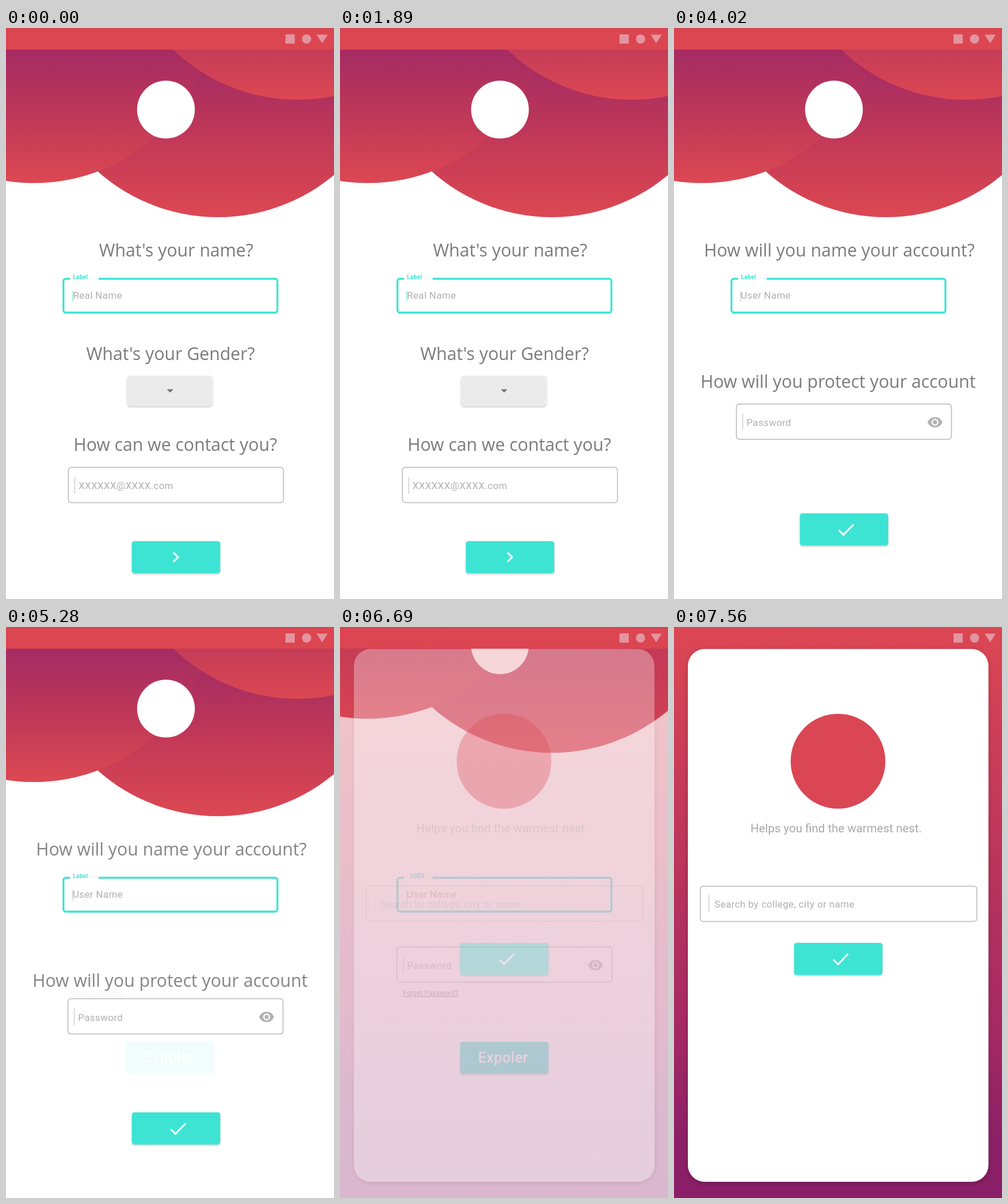
Recreate the animation shown at these times as an HTML page. Size 568 px wide and 987 px high, loop 7.8 s.

```html
<!DOCTYPE html>
<html lang="en">
<head>
<meta charset="utf-8">
<title>Sign-up flow</title>
<style>
  html, body { margin: 0; width: 100%; height: 100%; overflow: hidden; background: #fff; }
  svg { display: block; }
  .title { font: 30.1px "Open Sans", "Noto Sans", sans-serif; fill: #7b7b7b; }
  .hint { font: 17px Roboto, sans-serif; letter-spacing: .3px; fill: #b0b0b0; }
  .label { font: 700 10px Roboto, sans-serif; letter-spacing: .3px; fill: #3ee0d2; }
  .link { font: 12px Roboto, sans-serif; fill: #8c8c8c; text-decoration: underline; }
  .cta { font: 500 25px Roboto, sans-serif; letter-spacing: .5px; fill: #fff; }
  .tag { font: 20.4px Roboto, sans-serif; fill: #a9a9a9; }
  .option { font: 17px Roboto, sans-serif; fill: #767676; text-anchor: middle; }
  .icon { fill: none; stroke: #fff; stroke-width: 3; }
  .box { fill: #fff; stroke: #b9b9b9; stroke-width: 1.5; }
  .outline { fill: none; }
</style>
</head>
<body>
<svg id="stage" width="568" height="987" viewBox="0 0 568 987"></svg>
<script>
const LOOP = 7800, STEP = 30;
const TEAL = '#3ee4d4', RED = '#da4653';
const stage = document.getElementById('stage');

const text = (cls, x, y, s) => `<text class="${cls}" x="${x}" y="${y}">${s}</text>`;
const group = (id, body) => `<g id="${id}">${body}</g>`;
const caret = (x, y, h, color = '#cfcfcf') =>
  `<path d="M${x} ${y}v${h}" stroke="${color}" stroke-width="1.5"/>`;
const circle = (x, y, r, fill) => `<circle cx="${x}" cy="${y}" r="${r}" fill="${fill}"/>`;
const fade = (id, y1, y2, stops) =>
  `<linearGradient id="${id}" gradientUnits="userSpaceOnUse" x1="0" x2="0" y1="${y1}" y2="${y2}">` +
  stops.map(([at, color]) => `<stop offset="${at}" stop-color="${color}"/>`).join('') +
  '</linearGradient>';
const field = (x, y, w, cls = 'box') =>
  `<rect class="${cls}" x="${x}" y="${y}" width="${w}" height="61" rx="5"/>`;
const button = (x, y) =>
  `<rect x="${x}" y="${y}" width="153" height="55.5" rx="4.5" fill="${TEAL}" filter="url(#lift)"/>`;
const check = (x, y) => `<path class="icon" d="M${x - 12.5} ${y + 1}l8 8 17.5-18"/>`;
const eye = (x, y) =>
  `<path fill="#b3b3b3" fill-rule="evenodd" d="M${x - 13} ${y}q4-9 13-9t13 9q-4 9-13 9t-13-9z
    M${x - 6} ${y}a6 6 0 1 0 12 0a6 6 0 1 0-12 0z"/>` + circle(x, y, 3.7, '#b3b3b3');

const defs = `<defs>
  ${fade('leftFill', 45, 268, [[0, '#a62c62'], [.45, '#bd3759'], [1, '#dc4852']])}
  ${fade('mainFill', 65, 327, [[0, '#a52c62'], [.5, '#c33957'], [1, '#dc4852']])}
  ${fade('rightFill', 37, 124, [[0, '#c53b57'], [1, '#dc4852']])}
  ${fade('wall', 0, 987, [[0, '#dc4753'], [.4, '#bc355c'], [.72, '#a32963'], [.9, '#8b2067'], [1, '#8a1f67']])}
  <filter id="lift" x="-10%" y="-20%" width="120%" height="150%">
    <feDropShadow dx="0" dy="1.5" stdDeviation="1.5" flood-opacity=".25"/></filter>
  <filter id="cardLift" x="-10%" y="-5%" width="120%" height="110%">
    <feDropShadow dx="0" dy="3" stdDeviation="4" flood-opacity=".22"/></filter>
</defs>`;

const header = group('header',
  circle(367, 13.3, 313.7, 'url(#mainFill)') +
  circle(48, -48, 316, 'url(#leftFill)') +
  circle(505, -187.6, 311.6, 'url(#rightFill)') +
  circle(277, 141, 50, '#fff'));

const statusBar = '<path d="M0 0h568v37.5H0z" fill="#dc4651"/><path d="M0 .5h568" stroke="#c8434f" opacity=".6"/>';
const statusIcons = `<g fill="#e494a0"><path d="M484 11h16v16h-16zM538 11.5h19l-9.5 15z"/>${circle(520.5, 19, 8, '#e494a0')}</g>`;

const nameField = group('name',
  `<rect x="99.5" y="433.5" width="370.5" height="58.5" rx="4" fill="#fff" stroke="${TEAL}" stroke-width="3.3"/>` +
  '<path d="M111 433.5h49.5" stroke="#fff" stroke-width="5"/><path d="M146 432.5h14" stroke="#e3f8f6"/>' +
  group('labelOld', text('label', 116, 433.5, 'Label')) +
  group('labelNew', text('label', 121, 433.5, 'USER')) +
  group('realName', caret(115.7, 455, 18, '#8ae9e0') + text('hint', 116, 467.5, 'Real Name')) +
  group('userName', caret(115.7, 455, 18) + text('hint', 115.5, 467.5, 'User Name')));

const gender = group('gender',
  text('title', 139, 574, "What's your Gender?") +
  '<rect x="210" y="601" width="147.5" height="52.5" rx="5" fill="#ebebeb" filter="url(#lift)"/>' +
  '<path d="M278.5 624.5h11.5l-5.75 5.7z" fill="#757575"/>');

const menu = group('menu',
  '<path d="M210 654h148v93q0 5-5 5h-138q-5 0-5-5z" fill="#ebebeb"/>' +
  text('option', 284, 685, 'Male') + text('option', 284, 732, 'Female'));

const contact = group('contact',
  field(108, 759.5, 372.5) + caret(119, 776, 29) +
  group('email', text('hint', 125.5, 797, 'XXXXXX@XXXX.com')) +
  group('password', text('hint', 125.5, 797.5, 'Password') + eye(452, 791)));

const nextButton = group('next', button(218, 887) +
  group('chevron', '<path class="icon" d="M290 907l8 7.8-8 7.8"/>') +
  group('tick', check(298, 915)));

const login = group('login',
  text('link', 109, 637, 'Forget Password?') + button(208, 717) + text('cta', 239, 753, 'Expoler'));

// The card and its content fade in as separate layers.
const search = group('wallpaper', '<path d="M0 0h568v987H0z" fill="url(#wall)"/>') +
  group('card', '<rect x="24" y="38" width="520.5" height="921" rx="29" fill="#fff" filter="url(#cardLift)"/>') +
  group('cardContent',
    circle(284, 232, 82, RED) +
    text('tag', 132.5, 355, 'Helps you find the warmest nest.') +
    field(45.5, 448, 479, 'box outline') + caret(60.5, 463, 30) +
    text('hint', 70, 484.5, 'Search by college, city or name') +
    button(208, 546) + check(288.5, 574));

stage.innerHTML = defs + header + statusBar +
  group('askProfile', text('title', 161, 395, "What's your name?") + text('title', 117, 731, 'How can we contact you?')) +
  group('askAccount', text('title', 52, 395, 'How will you name your account?') +
    text('title', 46, 621.5, 'How will you protect your account')) +
  nameField + gender + contact + menu + nextButton + login + search + statusIcons;

const part = Object.fromEntries([...stage.querySelectorAll('g[id]')].map(g => [g.id, g]));

// cubic-bezier(0, 0, .58, 1)
function easeOut(x) {
  let lo = 0, hi = 1;
  for (let i = 0; i < 24; i++) {
    const s = (lo + hi) / 2;
    if (1.74 * (1 - s) * s * s + s ** 3 < x) lo = s; else hi = s;
  }
  return lo * lo * (3 - 2 * lo);
}

function progress(t, start, duration, lead = STEP) {
  if (t < start) return 0;
  const x = (t - start + lead) / duration;
  return x >= 1 ? 1 : easeOut(x);
}

function show(opacity, ...ids) {
  for (const id of ids) {
    part[id].setAttribute('opacity', opacity.toFixed(4));
    part[id].setAttribute('display', opacity > 0 ? 'inline' : 'none');
  }
}

const move = (id, x, y) => part[id].setAttribute('transform', `translate(${x} ${y})`);

function render(time) {
  const t = Math.floor(time % LOOP / STEP) * STEP;
  const account = progress(t, 3240, 810);
  const signIn = progress(t, 5280, 540, 25);
  const home = progress(t, 6690, 410, 86);

  show(progress(t, 600, 300) * (1 - progress(t, 1710, 210)), 'menu');
  show(1 - account, 'askProfile', 'gender', 'realName', 'email', 'chevron');
  show(account, 'userName', 'password', 'tick');
  show(account * (1 - signIn), 'askAccount');
  show(1 - signIn, 'labelOld');
  show(1 - signIn ** 2, 'next');
  show(signIn, 'labelNew');
  show(signIn * (1 - home), 'login');
  show(1 - home, 'name', 'contact');
  show(home, 'wallpaper', 'card', 'cardContent');

  move('contact', -9.5 * signIn, -109.5 * account - 97 * signIn);
  move('next', 0, -48 * account);
  move('header', 0, -340 * home);
}

const begin = performance.now();
function tick() {
  render(performance.now() - begin);
  requestAnimationFrame(tick);
}
render(0);
requestAnimationFrame(tick);
</script>
</body>
</html>
```
